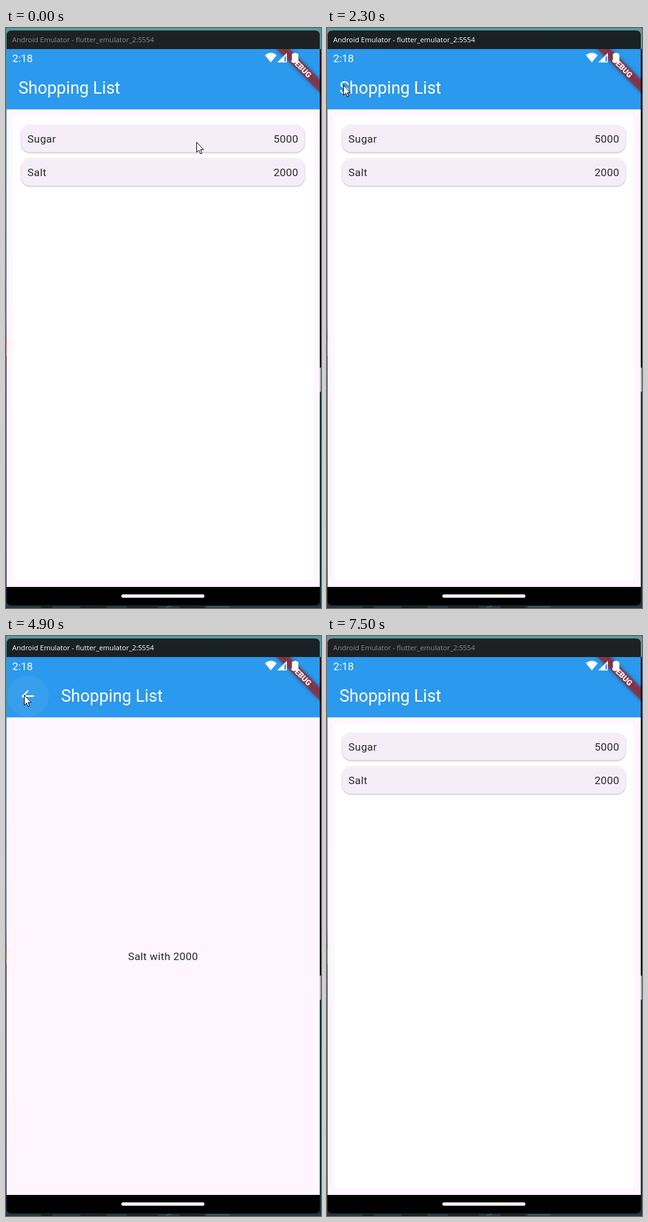
Animation, 508 px wide and 936 px high, one loop 7.6 s. Source, as an HTML page:

```html
<!DOCTYPE html>
<html lang="en">
<head>
<meta charset="utf-8">
<title>Shopping List</title>
<style>
  html, body { margin: 0; width: 100%; height: 100%; overflow: hidden; background: #25373b; }
  svg { display: block; width: 508px; height: 936px; }
  text { font-family: Roboto, sans-serif; }
  .bar { fill: #2b99ed; }
  .surface { fill: #fef5ff; }
  .heading { font-size: 27.07px; fill: #fff; }
  .body { font-size: 17.2px; letter-spacing: .31px; fill: #2a282d; }
  .end { text-anchor: end; }
  .mid { text-anchor: middle; }
  .caption { font: 11.29px "Open Sans", "Noto Sans", sans-serif; }
  .clock { font-size: 17.3px; fill: #fff; }
  .debug { font-size: 12.5px; font-weight: 900; fill: #fff; }
  .card { fill: #f5eef9; filter: drop-shadow(0 1px 1px rgba(0, 0, 0, .3)); }
  .page { transform-origin: 253.5px 468px; }
</style>
</head>
<body>
<svg viewBox="0 0 508 936">
  <defs>
    <clipPath id="screen"><rect x="1" y="34" width="505" height="868"/></clipPath>
    <linearGradient id="desk" x2="0" y2="1">
      <stop offset="0" stop-color="#5a9ba2"/>
      <stop offset=".5" stop-color="#6c8584"/>
      <stop offset=".56" stop-color="#44494b"/>
      <stop offset="1" stop-color="#223a42"/>
    </linearGradient>
  </defs>

  <!-- desktop behind the window -->
  <rect width="508" height="936" fill="url(#desk)"/>
  <rect y="505" width="1" height="24" fill="#a0604a"/>
  <path d="M506 34h2v514h-2z" fill="#0a0c0d"/>
  <path d="M506 548h2v39h-2z" fill="#a5a7a8"/>
  <path d="M506 587h2v349h-2z" fill="#16303a"/>
  <path d="M0 932h508v4H0z" fill="#243a40"/>
  <path d="M57 933h18v3h-18zM120 933h42v3h-42zM195 933h50v3h-50zM280 933h40v3h-40z" fill="#17211f"/>
  <path d="M258 935l8-2M324 934h36" stroke="#6a7375"/>

  <!-- window frame -->
  <path id="titlebar" d="M1 34V12q0-8 8-8H498q8 0 8 8V34z"/>
  <text id="caption" class="caption" x="10" y="23">Android Emulator - flutter_emulator_2:5554</text>
  <path d="M1 902H506V924q0 8-8 8H9q-8 0-8-8z"/>
  <rect x="186" y="914" width="134" height="5.4" rx="2.7" fill="#f4f1f4"/>

  <g clip-path="url(#screen)">
    <g id="list" class="page">
      <rect class="surface" x="1" y="34" width="505" height="868"/>
      <rect class="bar" x="1" y="34" width="505" height="97.3"/>
      <rect x="10.5" y="141.5" width="485.5" height="750.5" fill="#fff"/>
      <text class="heading" x="20" y="106">Shopping List</text>
      <rect class="card" x="24.5" y="156" width="457" height="44.5" rx="14.8"/>
      <text class="body" x="34.6" y="185">Sugar</text>
      <text class="body end" x="471.5" y="185">5000</text>
      <rect class="card" x="24.5" y="210.3" width="457" height="44.5" rx="14.8"/>
      <text class="body" x="34.6" y="239">Salt</text>
      <text class="body end" x="471.5" y="239">2000</text>
    </g>
    <rect id="scrim" x="1" y="34" width="505" height="868"/>
    <g id="detail" class="page">
      <rect class="surface" x="1" y="34" width="505" height="868"/>
      <rect class="bar" x="1" y="34" width="505" height="97.3"/>
      <circle id="ripple" cx="35.5" cy="97" r="33.5" fill="#fff" fill-opacity=".06"/>
      <path transform="translate(20.3 82.3) scale(1.23)" fill="#fff"
        d="M20 11H7.83l5.59-5.59L12 4l-8 8 8 8 1.41-1.41L7.83 13H20z"/>
      <text class="heading" x="88.7" y="106">Shopping List</text>
      <text id="item" class="body mid" x="253.2" y="523"></text>
    </g>

    <!-- debug ribbon -->
    <g transform="translate(506 34) rotate(45)">
      <rect x="-50" y="34.5" width="100" height="14.8" fill="#b71c1c" fill-opacity=".63"
        style="filter: drop-shadow(0 0 3px rgba(0, 0, 0, .6))"/>
      <text class="debug mid" y="46.4">DEBUG</text>
    </g>

    <!-- status bar -->
    <text class="clock" x="10" y="55">2:18</text>
    <path d="M427 55.5L417.5 44Q427 36 436.5 44z" fill="#fff"/>
    <path d="M453 40V55.5H437.5z" fill="#fff"/>
    <path d="M449 47l2.5-2.5V54H449z" class="bar"/>
    <path d="M463.5 40h5v1.5h3V56h-9.5q-1 0-1-1V41.5h2.5z" fill="#fff"/>
  </g>

  <path id="cursor" d="M.5 .5V16.5L4.2 13.2 6.7 19 9 18 6.6 12.2H11.6z"
    fill="#fff" stroke="#000" stroke-linejoin="round"/>
</svg>
<script>
const LOOP = 7600, STEP = 100, PUSH = 300;
const el = id => document.getElementById(id);
const [titlebar, caption, list, scrim, detail, ripple, item, cursor] =
  ["titlebar", "caption", "list", "scrim", "detail", "ripple", "item", "cursor"].map(el);

const visits = [
  { open: 250, close: 1850, label: "Sugar with 5000" },
  { open: 3450, close: 4950, label: "Salt with 2000" }
];
// time, x, y of the pointer tip
const path = [
  [0, 307, 184], [900, 307, 184], [1600, 26, 92], [2300, 26, 92], [2800, 141, 246],
  [4000, 141, 246], [4700, 29, 95], [5200, 29, 95], [5600, 510, 622]
];

const clamp = v => Math.min(1, Math.max(0, v));
const ramp = (v, a, b) => clamp((v - a) / (b - a));
const mix = (a, b, k) => a + (b - a) * k;
const easeOut = v => 1 - (1 - v) ** 3;
const smooth = v => v * v * (3 - 2 * v);

function pointerAt(t) {
  const i = path.findIndex(p => p[0] > t);
  if (i < 0) return path[path.length - 1].slice(1);
  const [a, b] = [path[i - 1], path[i]];
  const k = smooth(ramp(t, a[0], b[0]));
  return [mix(a[1], b[1], k), mix(a[2], b[2], k)];
}

function place(page, scale, opacity) {
  page.style.transform = `scale(${scale})`;
  page.style.opacity = opacity;
}

function render(t) {
  const active = t >= 100 && t < 7300;
  titlebar.setAttribute("fill", active ? "#192124" : "#1f2021");
  caption.setAttribute("fill", active ? "#fff" : "#8a8a8a");

  const visit = visits.find(v => t >= v.open && t < v.close + PUSH);
  let shade = 0, pressed = false;
  if (!visit) {
    place(list, 1, 1);
    place(detail, 1, 0);
  } else {
    item.textContent = visit.label;
    pressed = t > visit.close - 100;
    if (t < visit.close) {
      const p = ramp(t, visit.open, visit.open + PUSH), k = easeOut(p);
      place(list, mix(1, 1.05, k), 1);
      place(detail, mix(.85, 1, k), ramp(p, .125, .25));
      shade = .6 * ramp(p, .2075, .4175);
    } else {
      const p = ramp(t, visit.close, visit.close + PUSH), k = easeOut(p);
      place(list, mix(1.1, 1, k), 1);
      place(detail, mix(1, .9, k), 1 - ramp(p, .0825, .2075));
    }
  }
  scrim.style.opacity = shade;
  ripple.style.opacity = pressed ? 1 : 0;

  const [x, y] = pointerAt(t).map(Math.round);
  cursor.setAttribute("transform", `translate(${x} ${y})`);
}

const start = performance.now();
function tick() {
  const t = (performance.now() - start) % LOOP;
  render(Math.floor(t / STEP) * STEP);
  requestAnimationFrame(tick);
}
tick();
</script>
</body>
</html>
```
